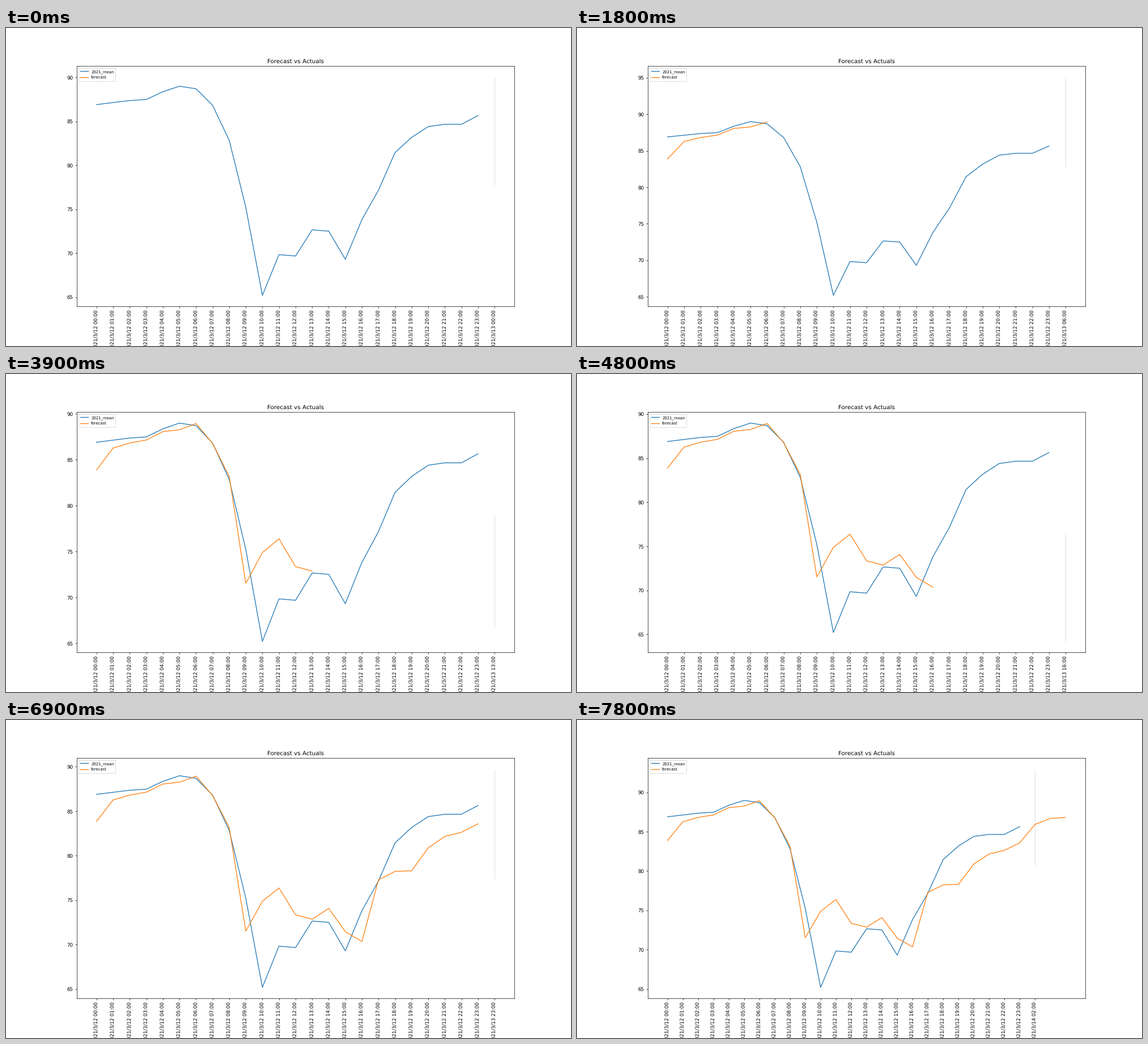
Recreate the animation shown at these times as a matplotlib script. Size 997 by 561 pixels, loop 8 s.

```python
import matplotlib.pyplot as plt
from matplotlib.animation import FuncAnimation
from matplotlib.ticker import MultipleLocator

WIDTH, HEIGHT = 997, 561
DPI = WIDTH / 16
TICK_MS, LOOP_MS, STEP_MS = 100, 8000, 300
HALF_BAND = 6.15
MARGIN = 0.05

ACTUAL = [86.90, 87.13, 87.36, 87.48, 88.36, 88.99, 88.70, 86.81,
          82.84, 75.22, 65.21, 69.84, 69.68, 72.66, 72.51, 69.31,
          73.82, 77.17, 81.45, 83.18, 84.40, 84.66, 84.66, 85.65]
FORECAST = [83.88, 86.27, 86.82, 87.14, 88.06, 88.26, 88.94, 86.77,
            83.18, 71.53, 74.88, 76.38, 73.35, 72.87, 74.08, 71.47,
            70.36, 77.29, 78.24, 78.31, 80.89, 82.17, 82.63, 83.59,
            85.93, 86.69, 86.82]
HOURS = len(ACTUAL)

plt.rcParams.update({"font.family": "DejaVu Sans", "text.hinting": "none"})


def time_label(hour):
    return f"2021/3/{12 + hour // 24} {hour % 24:02d}:00"


def padded(low, high):
    pad = MARGIN * (high - low)
    return low - pad, high + pad


# The small excess keeps the height from being rounded down a pixel.
fig = plt.figure(figsize=(WIDTH / DPI, (HEIGHT + 0.001) / DPI), dpi=DPI,
                 facecolor="white")
ax = fig.add_axes([0.125, 0.125, 0.775, 0.755])
ax.set_title("Forecast vs Actuals")
ax.plot(range(HOURS), ACTUAL, color="C0", label="2021_mean")
forecast_line, = ax.plot([], [], color="C1", label="forecast")
band = ax.vlines(HOURS, 0, 1, color="black", alpha=0.15, linewidth=1)
ax.legend(loc="upper left", fontsize=8)
ax.yaxis.set_major_locator(MultipleLocator(5))
ax.set_xticks(range(HOURS + 1))
ax.tick_params(axis="x", labelrotation=90)


def draw(frame):
    step = frame * TICK_MS // STEP_MS
    shown = FORECAST[:step + 1]
    low, high = shown[-1] - HALF_BAND, shown[-1] + HALF_BAND

    forecast_line.set_data(range(len(shown)), shown)
    band.set_segments([[(HOURS, low), (HOURS, high)]])
    ax.set_xticklabels([time_label(h) for h in range(HOURS)]
                       + [time_label(24 + step)])

    values = ACTUAL + shown + [low, high]
    ax.set_xlim(padded(0, max(HOURS, step)))
    ax.set_ylim(padded(min(values), max(values)))
    return forecast_line, band


anim = FuncAnimation(fig, draw, frames=LOOP_MS // TICK_MS, interval=TICK_MS,
                     repeat=True, repeat_delay=0, blit=False)
plt.show()
```
